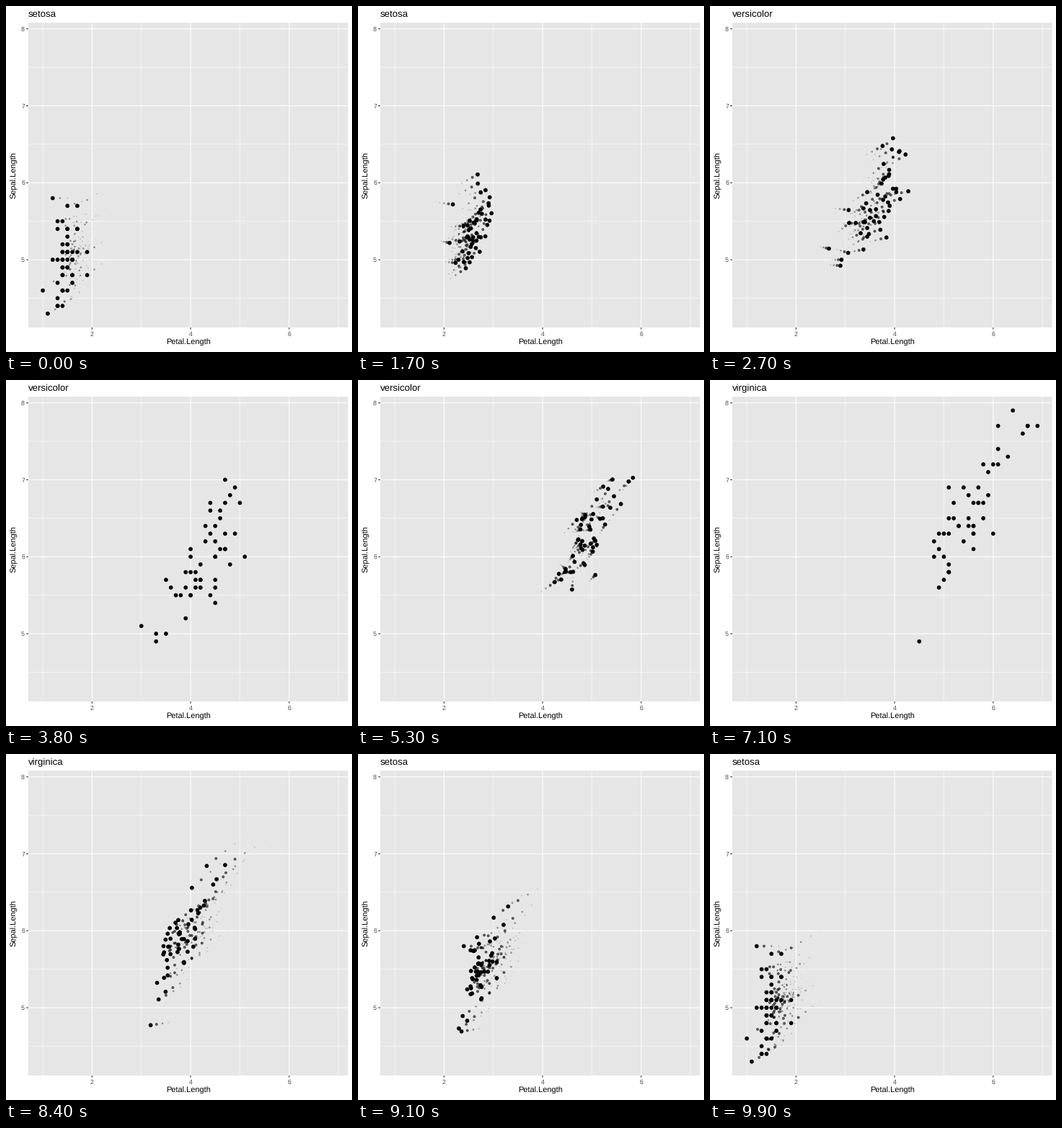
Animation of 480x480 px, one loop 10000 ms. Source, as a matplotlib script:

```python
import matplotlib.pyplot as plt
import numpy as np
from matplotlib.animation import FuncAnimation
from matplotlib.patches import Rectangle

plt.rcParams["font.family"] = "Liberation Sans"
plt.rcParams["text.hinting"] = "none"

SIZE, DPI = 480, 96
PT = 72 / DPI                  # points per pixel
FRAMES, INTERVAL = 100, 100
WAKE = 5

# Panel edges in pixels and its data limits
LEFT, RIGHT, TOP, BOTTOM = 30.9, 474.5, 23.1, 445.95
X0, X1, Y0, Y1 = 0.705, 7.195, 4.12, 8.08


def px(x):
    return LEFT + (x - X0) / (X1 - X0) * (RIGHT - LEFT)


def py(y):
    return BOTTOM - (y - Y0) / (Y1 - Y0) * (BOTTOM - TOP)


def flowers(petal, sepal):
    """Lengths in tenths, turned into pixel positions."""
    return np.column_stack([px(np.array(petal) / 10), py(np.array(sepal) / 10)])


setosa = flowers(
    [14, 14, 13, 15, 14, 17, 14, 15, 14, 15, 15, 16, 14, 11, 12, 15, 13,
     14, 17, 15, 17, 15, 10, 17, 19, 16, 16, 15, 14, 16, 16, 15, 15, 14,
     15, 12, 13, 14, 13, 15, 13, 13, 13, 16, 19, 14, 16, 14, 15, 14],
    [51, 49, 47, 46, 50, 54, 46, 50, 44, 49, 54, 48, 48, 43, 58, 57, 54,
     51, 57, 51, 54, 51, 46, 51, 48, 50, 50, 52, 52, 47, 48, 54, 52, 55,
     49, 50, 55, 49, 44, 51, 50, 45, 44, 50, 51, 48, 51, 46, 53, 50])
versicolor = flowers(
    [47, 45, 49, 40, 46, 45, 47, 33, 46, 39, 35, 42, 40, 47, 36, 44, 45,
     41, 45, 39, 48, 40, 49, 47, 43, 44, 48, 50, 45, 35, 38, 37, 39, 51,
     45, 45, 47, 44, 41, 40, 44, 46, 40, 33, 42, 42, 42, 43, 30, 41],
    [70, 64, 69, 55, 65, 57, 63, 49, 66, 52, 50, 59, 60, 61, 56, 67, 56,
     58, 62, 56, 59, 61, 63, 61, 64, 66, 68, 67, 60, 57, 55, 55, 58, 60,
     54, 60, 67, 63, 56, 55, 55, 61, 58, 50, 56, 57, 57, 62, 51, 57])
virginica = flowers(
    [60, 51, 59, 56, 58, 66, 45, 63, 58, 61, 51, 53, 55, 50, 51, 53, 55,
     67, 69, 50, 57, 49, 67, 49, 57, 60, 48, 49, 56, 58, 61, 64, 56, 51,
     56, 61, 56, 55, 48, 54, 56, 51, 51, 59, 57, 52, 50, 52, 54, 51],
    [63, 58, 71, 63, 65, 76, 49, 73, 67, 72, 65, 64, 68, 57, 58, 64, 65,
     77, 77, 60, 69, 56, 77, 63, 67, 72, 62, 61, 64, 72, 74, 79, 64, 63,
     61, 77, 63, 64, 60, 69, 67, 69, 58, 68, 67, 67, 63, 65, 62, 59])

STATES = [("setosa", setosa), ("versicolor", versicolor), ("virginica", virginica)]
# start, first moving step, first step with the next title, end
LEGS = [(6, 7, 21, 33), (39, 41, 54, 66), (73, 74, 87, 99)]


def pose(k):
    k %= FRAMES
    for i, (start, first, _, end) in enumerate(LEGS):
        here, there = STATES[i][1], STATES[(i + 1) % 3][1]
        if k < first:
            return here
        if k <= end:
            return here + (there - here) * (k - start) / (end - start)
    return setosa


def title_at(k):
    passed = sum(k >= leg[2] for leg in LEGS)
    return STATES[passed % 3][0]


fig = plt.figure(figsize=(SIZE / DPI, SIZE / DPI), dpi=DPI, facecolor="white")
ax = fig.add_axes([0, 0, 1, 1])
ax.set_xlim(0, SIZE)
ax.set_ylim(SIZE, 0)
ax.axis("off")


def line(xs, ys, color, width, z):
    ax.plot(xs, ys, color=color, lw=width * PT, solid_capstyle="butt",
            snap=False, zorder=z)


def label(x, y, text, size, color="black", **kw):
    return ax.text(x, y, text, fontsize=size * PT, color=color,
                   va="baseline", **kw)


ax.add_patch(Rectangle((LEFT, TOP), RIGHT - LEFT, BOTTOM - TOP,
                       fc="#e6e6e6", ec="none", snap=False, zorder=0))

for values, width, z in (((1, 3, 5, 7), 0.53, 1), ((2, 4, 6), 1.07, 2)):
    for v in values:
        line([px(v)] * 2, [TOP, BOTTOM], "white", width, z)
for values, width, z in (((4.5, 5.5, 6.5, 7.5), 0.53, 1), ((5, 6, 7, 8), 1.07, 2)):
    for v in values:
        line([LEFT, RIGHT], [py(v)] * 2, "white", width, z)

for v in (2, 4, 6):
    line([px(v)] * 2, [BOTTOM, BOTTOM + 2.75], "#333333", 1.07, 3)
    label(px(v), 457.5, str(v), 8.8, "#4d4d4d", ha="center")
for v in (5, 6, 7, 8):
    line([LEFT - 2.75, LEFT], [py(v)] * 2, "#333333", 1.07, 3)
    label(LEFT - 4.95, py(v) + 3.2, str(v), 8.8, "#4d4d4d", ha="right")

label((LEFT + RIGHT) / 2, 470, "Petal.Length", 11, ha="center")
label(14, (TOP + BOTTOM) / 2, "Sepal.Length", 11, ha="center",
      rotation=90, rotation_mode="anchor")
title = label(LEFT, 15, "setosa", 13.2, ha="left")

# Cubic falloff from the oldest echo up to the live points
fade = np.repeat((np.arange(1, WAKE + 2) / (WAKE + 1)) ** 3, len(setosa))
diameter = 0.75 * (5.69 * fade + 0.945) * PT
colors = np.zeros((len(fade), 4))
colors[:, 3] = fade


def cloud(k):
    return np.vstack([pose(k - lag) for lag in range(WAKE, -1, -1)])


start = cloud(0)
dots = ax.scatter(start[:, 0], start[:, 1], s=diameter ** 2, facecolors=colors,
                  edgecolors=colors, linewidths=0.71 * PT, snap=False, zorder=5)


def update(k):
    dots.set_offsets(cloud(k))
    title.set_text(title_at(k))
    return dots, title


anim = FuncAnimation(fig, update, frames=FRAMES, interval=INTERVAL,
                     repeat=True, repeat_delay=0)
plt.show()
```
